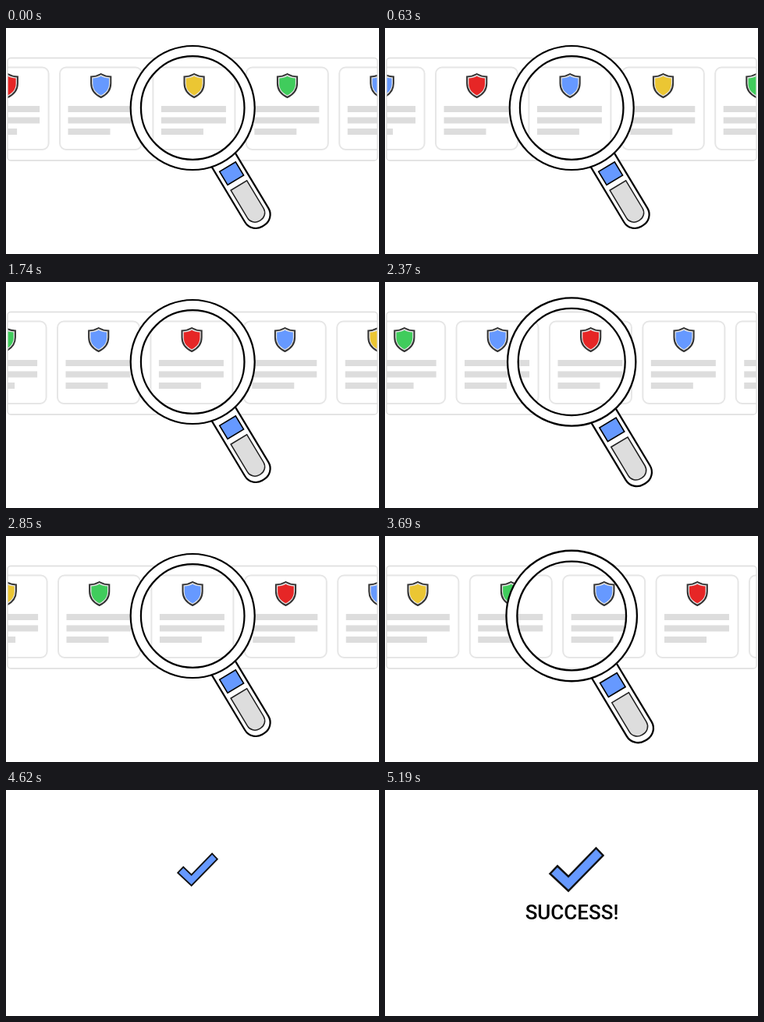
Animation of 478 by 290 pixels, one loop 6300 ms. Source, as an HTML page:

```html
<!DOCTYPE html>
<html lang="en">
<head>
<meta charset="utf-8">
<title>Shield search</title>
<style>
  html, body { margin: 0; width: 100%; height: 100%; overflow: hidden; background: #fff; }
  svg { display: block; width: 478px; height: 290px; }
  text { font: 500 26px Roboto, sans-serif; text-anchor: middle; }
</style>
</head>
<body>
<svg viewBox="0 0 478 290">
  <defs>
    <clipPath id="window"><rect x="2" y="38" width="474" height="132" rx="4"/></clipPath>
    <path id="crest" d="M0 -15C4 -12.700 8 -11.600 12.600 -11.600V-3C12.600 6 7 11.700 0 15C-7 11.700 -12.600 6 -12.600 -3V-11.600C-8 -11.600 -4 -12.700 0 -15Z"/>
    <g id="card">
      <rect x="0" y="50.500" width="105" height="105.500" rx="8" fill="#fff" stroke="#e6e6e6" stroke-width="2"/>
      <path d="M10.500 104H93.500M10.500 118.500H93.500M10.500 133H64.500" stroke="#ddd" stroke-width="8"/>
      <g transform="translate(52.700 74)">
        <use href="#crest" fill="#e4e4e4" stroke="#333" stroke-width="2"/>
        <use href="#crest" fill="currentColor" transform="scale(.82)"/>
      </g>
    </g>
  </defs>

  <g id="strip">
    <g clip-path="url(#window)"><g id="cards"></g></g>
    <rect x="2" y="38.500" width="474" height="131.500" rx="4" fill="none" stroke="#dcdcdc" stroke-width="1.300"/>
  </g>

  <g id="lens" stroke="#000" stroke-width="2.200">
    <g transform="translate(-.8 -.3) rotate(-31)">
      <path d="M-17.500 74V161A16 16 0 0 0 -1.500 177H1.500A16 16 0 0 0 17.500 161V74Z" fill="#fff"/>
      <rect x="-12" y="88.500" width="24" height="20" fill="#69f" stroke-width="1.600"/>
      <path d="M-12 116.500H12V158A11 11 0 0 1 1 169H-1A11 11 0 0 1 -12 158Z" fill="#ddd" stroke="#222" stroke-width="1.500"/>
    </g>
    <circle r="73" fill="none" stroke="#fff" stroke-width="13"/>
    <circle r="79.500" fill="none"/>
    <circle r="66.300" fill="none"/>
  </g>

  <path id="check" d="M25 -28L34 -18.500L-10.500 27L-34 5L-24.500 -5L-10.500 8.500Z" fill="#69f" stroke="#111" stroke-width="2.500"/>
  <text id="label" y="9">SUCCESS!</text>
</svg>

<script>
const LOOP = 6300, STEP = 30, PITCH = 119.4, OVERSHOOT = 2.4, SWELL = 0.108;
const COLORS = ['#6699ff', '#ebc633', '#40cc5c', '#6699ff', '#e62626'];
const STOPS = [69, 65, 66, 67, 66].map((x, i) => x + i * PITCH);
const MOVES = [
  { start: 0, end: 630, lensEnd: 630, power: 1.08 },
  { start: 1050, end: 1710, lensEnd: 1740, power: 1.24 },
  { start: 2220, end: 2850, lensEnd: 2850, power: 1.08 },
  { start: 3450, end: 4080, lensEnd: 4080, power: 1.08 },
];
const EXIT = 4230, CHECK_IN = 4560, LABEL_IN = 4890, SETTLED = 5190;

const el = id => document.getElementById(id);
const progress = (t, start, end) => Math.min(1, Math.max(0, (t - start) / (end - start)));
const backIn = p => p * p * ((OVERSHOOT + 1) * p - OVERSHOOT);
const backOut = p => 1 - backIn(1 - p);

for (let k = -5; k < 4; k++) {
  const color = COLORS[(k + 5) % 5];
  el('cards').insertAdjacentHTML('beforeend', `<use href="#card" x="${k * PITCH}" color="${color}"/>`);
}

function place(id, x, y, scale) {
  el(id).setAttribute('transform', `translate(${x} ${y}) scale(${Math.max(0, scale)})`);
  el(id).style.display = scale > 0.001 ? '' : 'none';
}

// Slow swell followed by a quick release.
const swell = p => SWELL * (p < 0.77 ? p / 0.77 : (1 - p) / 0.23);

function draw(t) {
  let x = STOPS[0], scale = 1;
  MOVES.forEach((m, i) => {
    x += (STOPS[i + 1] - STOPS[i]) * progress(t, m.start, m.end) ** m.power;
    scale += swell(progress(t, m.start, m.lensEnd));
  });
  const exit = progress(t, EXIT, CHECK_IN);
  el('cards').setAttribute('transform', `translate(${x})`);
  el('strip').style.opacity = 1 - exit ** 2;
  place('lens', 239.2, 102.5, scale - backIn(exit));
  place('check', 245.5, 102.5, backOut(progress(t, CHECK_IN, LABEL_IN)));
  place('label', 239.5, 157, backOut(progress(t, LABEL_IN, SETTLED)));
}

const origin = performance.now();
function tick() {
  const t = (performance.now() - origin) % LOOP;
  draw(Math.floor(t / STEP) * STEP);
  requestAnimationFrame(tick);
}
tick();
</script>
</body>
</html>
```
